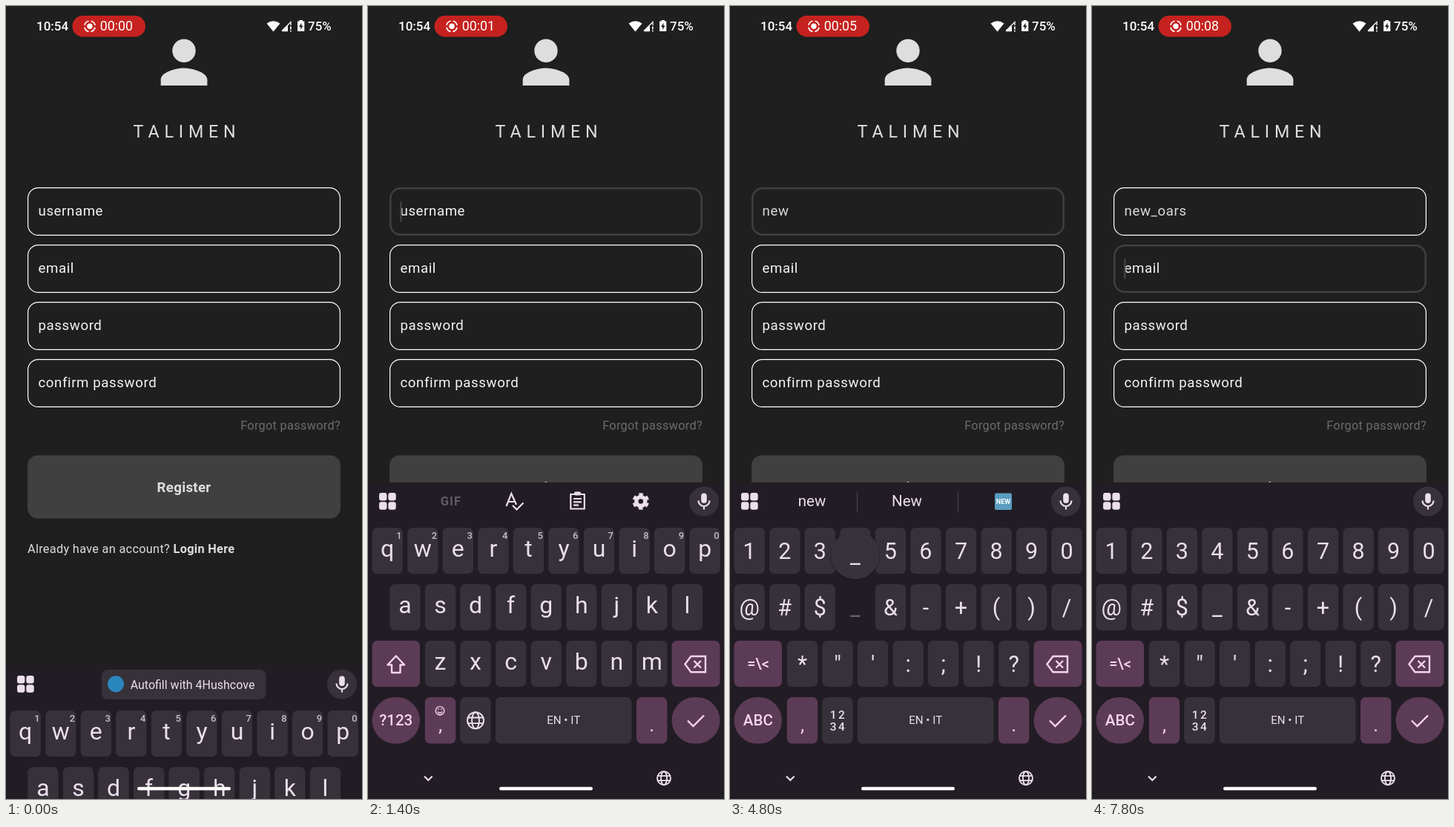
Animation, 480 px wide and 1067 px high, one loop 8000 ms. Source, as an HTML page:

```html
<!DOCTYPE html>
<html lang="en">
<head>
<meta charset="utf-8">
<title>Register form</title>
<style>
html, body { margin: 0; width: 100%; height: 100%; overflow: hidden; background: #1f1f1f; }
svg { display: block; width: 100vw; height: 100vh; font-family: Roboto, sans-serif; }
text { white-space: pre; }
.line { fill: none; stroke: #ebdfec; stroke-width: 2.2; }
.pink { fill: none; stroke: #f6d3ee; stroke-width: 2.4; }
</style>
</head>
<body>
<svg viewBox="0 0 480 1067">
  <g fill="#dedede">
    <circle cx="240" cy="60.2" r="15.7"/>
    <path transform="translate(193 28.7) scale(3.92)" d="M12 14c-2.67 0-8 1.34-8 4v2h16v-2c0-2.66-5.33-4-8-4z"/>
    <text x="171.6" y="176.5" font-size="23.3" letter-spacing="6.8">TALIMEN</text>
  </g>
  <g id="fields" font-size="18.7" letter-spacing=".58"></g>
  <text x="451" y="570" font-size="16.33" letter-spacing=".29" text-anchor="end" fill="#6c6c6c">Forgot password?</text>
  <rect x="29" y="604.5" width="422" height="85" rx="14" fill="#404040"/>
  <g fill="#dedede" letter-spacing=".29">
    <text x="240" y="653.5" font-size="18.7" font-weight="700" text-anchor="middle">Register</text>
    <text x="29" y="736.3" font-size="16.33">Already have an account?</text>
    <text x="225.6" y="736.3" font-size="16.33" font-weight="700">Login Here</text>
  </g>

  <g fill="#fff" font-size="17">
    <text x="41" y="33" font-weight="500">10:54</text>
    <rect x="89.5" y="13" width="98.5" height="28.5" rx="14.2" fill="#c5221f"/>
    <circle cx="113" cy="27.3" r="3.7"/>
    <circle cx="113" cy="27.3" r="7.2" fill="none" stroke="#fff" stroke-width="1.7" stroke-dasharray="8.2 3.1" stroke-dashoffset="-1.5"/>
    <text id="clock" x="126.8" y="33" font-size="17.8"></text>
    <path d="M351.5 23.5Q360.5 17 369.5 23.5L360.5 34.5Z"/>
    <path d="M372 33.5L384 21.5V26M372 33.5H380" fill="none" stroke="#fff" stroke-width="1.3"/>
    <path d="M373 33.5L380 26.5V33.5Z"/>
    <path d="M383 27.5h1.7v4h-1.7zM383 32.7h1.7v1.7h-1.7z"/>
    <path d="M395.5 20.5V19h4.5v1.5h2.3V34h-9.2V20.5z"/>
    <path d="M398.6 22.5L395 28h2.2v4l3.4-5.4h-2.2z" fill="#1f1f1f"/>
    <text x="407" y="33" font-weight="500">75%</text>
  </g>

  <g id="board"></g>
  <rect x="177" y="1050.7" width="126" height="4.6" rx="2.3" fill="#fff"/>
</svg>
<script>
const PITCH = 47.55, INK = '#ebdfec', PINK = '#f6d3ee', KEY = '#37313a', ACCENT = '#5c3b56';
const hints = ['username', 'email', 'password', 'confirm password'];
const pages = {
  low: ['qwertyuiop', 'asdfghjkl', 'zxcvbnm'],
  up: ['QWERTYUIOP', 'ASDFGHJKL', 'ZXCVBNM'],
  sym: ['1234567890', '@#$_&-+()/', '*"\':;!?']
};

// Each cue changes part of the state from its time on (ms).
const cues = [
  [0, { drop: 246, bar: 'autofill', page: 'low', text: '', focus: -1, caret: 0, press: '' }],
  [200, { drop: 400 }],
  [400, { drop: 430 }],
  [1200, { drop: 134, bar: 'tools', focus: 0, caret: 1 }],
  [1400, { drop: 0 }],
  [1600, { press: 'n' }],
  [1800, { text: 'n', press: 'e', bar: 'words' }],
  [2000, { text: 'ne', press: 'w' }],
  [2200, { text: 'new', press: '' }],
  [2800, { caret: 0 }],
  [3200, { caret: 1 }],
  [3800, { caret: 0, page: 'up' }],
  [4200, { caret: 1, page: 'sym' }],
  [4800, { caret: 0, press: '_' }],
  [5000, { caret: 1, text: 'new_', press: '', bar: 'tools' }],
  [5200, { page: 'low', press: 'o' }],
  [5400, { text: 'new_o', press: 'a' }],
  [5600, { text: 'new_oa', press: 'r' }],
  [5800, { text: 'new_oar', press: 's' }],
  [6000, { text: 'new_oars', press: '' }],
  [6600, { caret: 0 }],
  [6800, { focus: 1, caret: 1 }],
  [7000, { bar: 'none' }],
  [7400, { page: 'sym', caret: 0 }],
  [7800, { caret: 1 }]
];

const $ = id => document.getElementById(id);
const esc = s => s.replace(/&/g, '&amp;').replace(/</g, '&lt;');
const label = (s, x, y, size, fill = INK, more = '') =>
  `<text x="${x}" y="${y}" font-size="${size}" fill="${fill}" text-anchor="middle" ${more}>${esc(s)}</text>`;
const box = (x, y, w, h, rx, fill, more = '') =>
  `<rect x="${x}" y="${y}" width="${w}" height="${h}" rx="${rx}" fill="${fill}" ${more}/>`;
const path = (d, cls = 'line', more = '') => `<path class="${cls}" d="${d}" ${more}/>`;
const globe = (x, y, r) => `<g class="line" style="stroke-width:1.9"><circle cx="${x}" cy="${y}" r="${r}"/>
  <ellipse cx="${x}" cy="${y}" rx="${r * .45}" ry="${r}"/>
  <path d="M${x - r * .94} ${y - r * .35}h${r * 1.88}M${x - r * .94} ${y + r * .35}h${r * 1.88}"/></g>`;

function fields(s) {
  $('fields').innerHTML = hints.map((hint, i) => {
    const y = 244 + 77 * i, on = s.focus === i, d = on ? 1.2 : .6;
    const typed = i === 0 && s.text;
    return box(29 + d, y + d, 422 - 2 * d, 65 - 2 * d, 14, 'none',
      `stroke="${on ? '#404040' : '#fff'}" stroke-width="${2 * d}"`) +
      `<text x="43.5" y="${y + 38}" fill="${typed ? '#d9d9d9' : '#f4f4f4'}">${typed || hint}</text>`;
  }).join('');
  if (!s.caret) return;
  const value = s.focus === 0 ? s.text : '';
  const width = value ? $('fields').querySelector('text').getComputedTextLength() : 0;
  $('fields').innerHTML += box(43.2 + width, 263 + 77 * s.focus, 2.3, 27.5, 1, '#454545');
}

function toolbar(s) {
  let out = '';
  for (const x of [15, 27.3]) for (const y of [655, 667.3]) out += box(x, y, 10.4, 10.4, 3, INK);
  out += `<circle cx="453" cy="666.5" r="20" fill="${KEY}"/>` + box(449.2, 655.5, 7.6, 13.5, 3.8, INK) +
    path('M445.5 665.5a7.5 7.5 0 0 0 15 0M453 673v4.5');
  if (s.bar === 'autofill') {
    out += box(129, 647, 221.5, 40, 8, KEY) + '<circle cx="148" cy="666.3" r="11" fill="#2b86bd"/>' +
      label('Autofill with 4Hushcove', 251.5, 672.5, 16);
  } else if (s.bar === 'tools') {
    out += label('GIF', 112, 672, 16.5, '#625b65', 'font-weight="700" letter-spacing="1.2"') +
      path('M186.5 673L193.3 656L200 671M189 667h9M195 672l5.5 5.5l9-9') +
      path('M273.3 657h18.5v19.5h-18.5zM277 663h11M277 667.3h11M277 671.6h7') + box(278, 653.5, 9, 5, 2, INK) +
      `<circle cx="367.8" cy="666.5" r="6" fill="none" stroke="${INK}" stroke-width="5.4"/>
       <circle cx="367.8" cy="666.5" r="9.3" fill="none" stroke="${INK}" stroke-width="4"
         stroke-dasharray="5.3 4.439" stroke-dashoffset="-2.2"/>`;
  } else if (s.bar === 'words') {
    out += label(s.text, 110.5, 673, 20.5) +
      label(s.text[0].toUpperCase() + s.text.slice(1), 238.5, 673, 20.5) +
      path('M171.5 653v28M307.5 653v28', 'line', 'style="stroke:#453f48;stroke-width:1.3"');
    if (s.text === 'new') {
      out += box(357, 655.5, 23, 22.5, 2, '#5b9dbf') + label('NEW', 368.5, 670, 9, '#fff', 'font-weight="700"');
    }
  }
  return out;
}

function keys(s) {
  const sym = s.page === 'sym';
  let out = '', popup = '';
  pages[s.page].forEach((row, r) => {
    const top = 702 + 76 * r;
    const left = r === 2 ? 76.8 : row.length === 9 ? 29.3 : 5.5;
    [...row].forEach((c, i) => {
      const x = left + PITCH * i, mid = x + 20.7;
      const base = top + (s.page === 'low' ? 39 : 42), size = sym ? 30.5 : 32;
      const down = c === s.press;
      if (!down) out += box(x, top, 41.4, 62, 7, KEY);
      out += label(c, mid, base, size, down ? '#6a626d' : INK);
      if (r === 0 && !sym) out += label('1234567890'[i], x + 36.5, top + 14.5, 13, '#cbbfcd', 'font-weight="500"');
      if (down) {
        popup = `<circle cx="${mid}" cy="${top - 38.5}" r="33.5" fill="#1d1820" opacity=".5"/>
          <circle cx="${mid}" cy="${top - 39.5}" r="32.7" fill="#38323b"/>` + label(c, mid, base - 70, size);
      }
    });
  });
  out += box(5.5, 854, 64.5, 62, 7, ACCENT) + box(409.5, 854, 65, 62, 7, ACCENT);
  out += sym ? label('=\\<', 38, 892, 20, PINK, 'font-weight="500"')
    : path('M37.8 874.5L49 886.5H43.5V897H32V886.5H26.5Z', 'pink',
      `stroke-linejoin="round" ${s.page === 'up' ? `style="fill:${PINK}"` : ''}`);
  out += path('M435.5 875H455V896.3H435.5L427.5 885.6ZM439.5 881l9.5 9.5M449 881l-9.5 9.5', 'pink');

  out += box(5.5, 930, 64.5, 62.5, 31.2, ACCENT) + box(76.8, 930, 41.4, 62.5, 7, ACCENT) +
    box(124.3, 930, 41.4, 62.5, 7, KEY) + box(171.9, 930, 183.7, 62.5, 7, KEY) +
    box(362, 930, 41.4, 62.5, 7, ACCENT) + box(409.5, 930, 65, 62.5, 31.2, ACCENT);
  out += label(sym ? 'ABC' : '?123', 37.8, 968, 20.5, PINK, 'font-weight="500"') +
    label(',', 97.5, 976, 26, PINK) + label('.', 382.7, 976, 26, PINK) +
    label('EN • IT', 263.7, 966.3, 15.2) + path('M431 961.5l7.5 7.5l14.5-14.5', 'pink');
  if (sym) {
    out += ['12', '34'].map((n, i) => label(n, 146, 959 + 16 * i, 15.5, INK, 'font-weight="500" letter-spacing="2.5"')).join('');
  } else {
    out += globe(145, 961.3, 11) +
      `<g class="pink" style="stroke-width:1.4"><circle cx="97" cy="948.3" r="5.7"/><path d="M94 949.5q3 4 6 0M94.3 946.3h1.6M98.1 946.3h1.6"/></g>`;
  }
  return out + popup;
}

function draw(t) {
  const s = Object.assign({}, ...cues.filter(c => c[0] <= t).map(c => c[1]));
  $('clock').textContent = '00:0' + Math.floor((t + 400) / 1000);
  fields(s);
  $('board').setAttribute('transform', `translate(0 ${s.drop})`);
  $('board').innerHTML = box(0, 641, 480, 430, 0, '#221c25') + toolbar(s) + keys(s) +
    path('M76 1036.5l5.3 5.3l5.3-5.3') + globe(399, 1039, 9);
}

// The screen refreshes five times a second.
let shown = -1;
function tick() {
  const t = Math.floor(performance.now() % 8000 / 200) * 200;
  if (t !== shown) draw(shown = t);
  requestAnimationFrame(tick);
}
tick();
</script>
</body>
</html>
```
